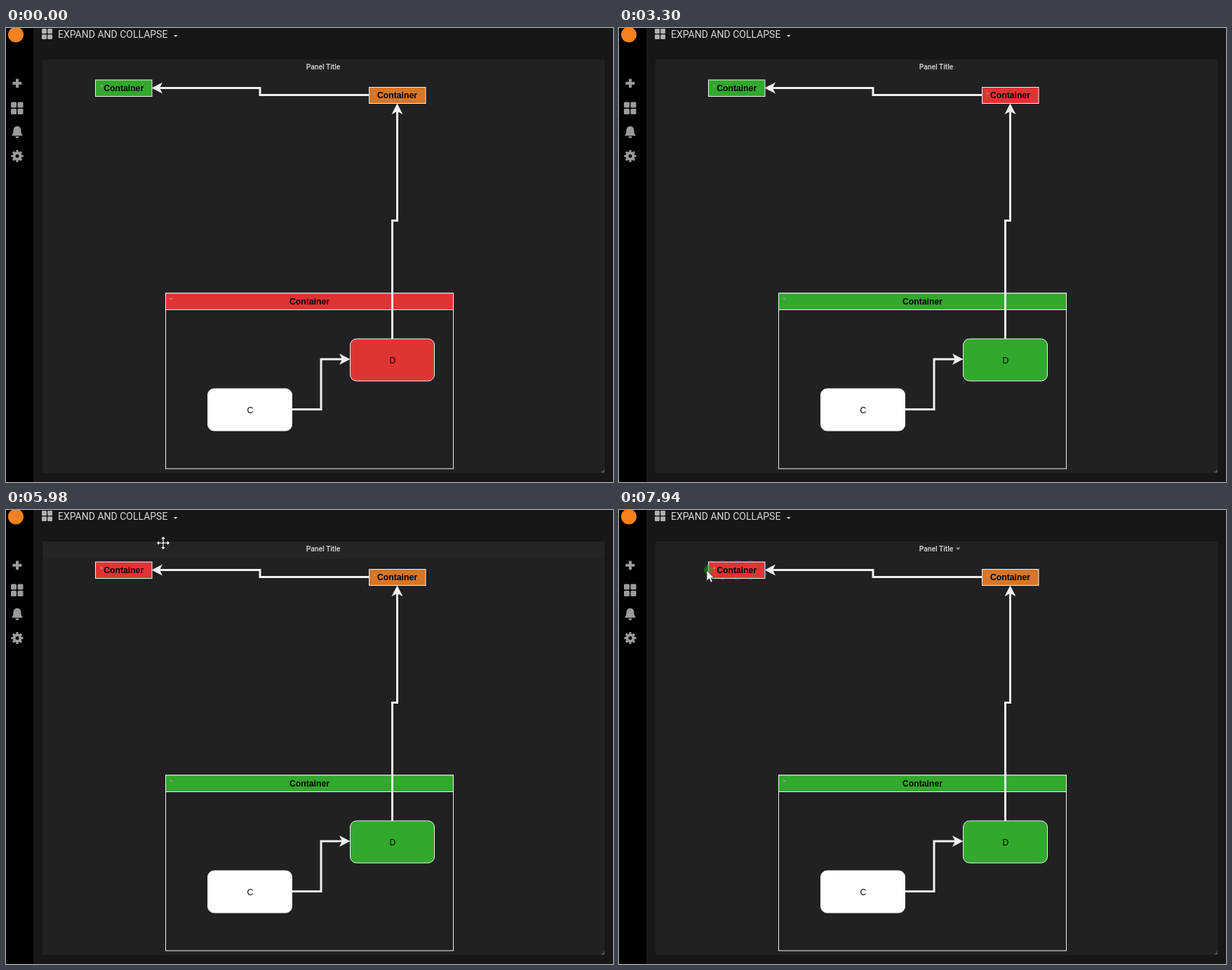
An HTML page for the animation above (8 s loop, 865 by 647 pixels).

```html
<!DOCTYPE html>
<html lang="en">
<head>
<meta charset="utf-8">
<title>Expand and collapse</title>
<style>
  html, body { margin: 0; width: 100%; height: 100%; overflow: hidden; background: #161719; }
  svg { display: block; width: 865px; height: 647px; }
  text { font-family: Roboto, sans-serif; fill: #d8d9da; }
  .label { font: bold 12.2px "Liberation Sans", Arial, sans-serif; fill: #000; text-anchor: middle; }
  .letter { font-weight: normal; }
  .frame { stroke: #f0f0f0; }
  .wire { fill: none; stroke: #f0f0f0; stroke-width: 3; }
  .tip { fill: #f0f0f0; }
  .fold { fill: #b4a8a8; opacity: .65; }
  .icon { fill: #9b9b9b; }
  #tooltip text { font-size: 9.7px; }
  #tooltip .strong { font-weight: 700; }
  #sparks { fill: none; stroke-width: 1; }
</style>
</head>
<body>
<svg viewBox="0 0 865 647">
  <defs>
    <path id="arrowhead" class="tip" d="M0 0L-15.5-8L-11.5 0L-15.5 8Z"/>
    <g id="grid">
      <rect width="8" height="8" rx="1.5"/><rect x="9.5" width="8" height="8" rx="1.5"/>
      <rect y="9.5" width="8" height="8" rx="1.5"/><rect x="9.5" y="9.5" width="8" height="8" rx="1.5"/>
    </g>
  </defs>

  <rect width="865" height="647" fill="#161719"/>
  <rect width="39" height="647"/>
  <circle cx="14" cy="9.5" r="11" fill="#f5821f"/>
  <g class="icon">
    <path d="M14 72.5h4v4.2h4.3v4H18v4.2h-4v-4.2H9.300v-4H14z"/>
    <use href="#grid" x="7" y="105.500"/>
    <path d="M16 140c-4 0-5.500 3-5.500 6.500 0 4-1.500 5-2.500 7h16c-1-2-2.500-3-2.500-7 0-3.500-1.500-6.500-5.500-6.500zM13.500 154.500h5a2.500 2.500 0 0 1-5 0z"/>
    <g fill="none" stroke="#9b9b9b">
      <circle cx="16" cy="182.500" r="4.500" stroke-width="4"/>
      <circle cx="16" cy="182.500" r="7.200" stroke-width="2.800" pathLength="16" stroke-dasharray="1.100 .9" stroke-dashoffset=".55"/>
    </g>
    <use href="#grid" transform="translate(51 1) scale(.86)" fill="#b0b0b0"/>
  </g>
  <text x="74" y="14" font-size="14">EXPAND AND COLLAPSE</text>
  <path d="M239 10h5.500l-2.750 3z" fill="#d8d9da"/>

  <rect x="52" y="45" width="801" height="589" fill="#212124"/>
  <rect id="header" x="52" y="45" width="801" height="24" fill="#252528"/>
  <text x="452" y="59" font-size="10.300" font-weight="500" text-anchor="middle">Panel Title</text>
  <path id="menuCaret" d="M480 53.500h6.500l-3.250 3.800z" fill="#8e8e8e"/>
  <path d="M852 629v4h-4M850 633l2-2" fill="none" stroke="#77787a" stroke-width=".8"/>
  <g id="spinner" fill="#8e8e8e"></g>

  <rect class="frame" x="227.500" y="378" width="410" height="250" fill="none"/>
  <g class="frame">
    <rect id="boxA" x="127.500" y="74" width="80.500" height="23.500"/>
    <rect id="boxB" x="517.500" y="84.500" width="80.500" height="23"/>
    <rect id="titleD" x="227.500" y="378" width="410" height="23.500"/>
    <rect id="boxD" x="490.500" y="443" width="120" height="60" rx="9"/>
    <rect x="287.500" y="514" width="120" height="60" rx="9" fill="#fff"/>
  </g>
  <g class="fold">
    <path d="M135 80.500l3 2.200-3 2.200z"/>
    <path d="M524.500 91l3 2.200-3 2.200z"/>
    <path d="M233 385h5.500l-2.750 2.500z"/>
  </g>
  <g class="label">
    <text class="label" x="167.700" y="89.500">Container</text>
    <text class="label" x="557.500" y="100">Container</text>
    <text class="label" x="432.500" y="393.500">Container</text>
    <text class="label letter" x="551" y="478">D</text>
    <text class="label letter" x="348" y="549">C</text>
  </g>
  <path class="wire" d="M517 95.500H362V85.500H218M550.500 443V274.500H557.500V118M408 543.500H449V472H480"/>
  <use href="#arrowhead" transform="translate(207.500 85.500) rotate(180)"/>
  <use href="#arrowhead" transform="translate(557.500 107.500) rotate(-90)"/>
  <use href="#arrowhead" transform="translate(490.500 472)"/>

  <path id="anchors" fill="none" stroke="#29b6f2" stroke-width=".9"/>
  <circle id="target" cx="127.500" cy="85.500" r="6.500" fill="#00c800" opacity=".42"/>

  <g id="tooltip">
    <rect x="195" y="88" width="102.500" height="162.500" rx="3" fill="#141414"/>
    <text class="strong" x="206" y="106">2019-10-29 7:30:2</text>
    <text x="206" y="125">M3 : <tspan class="strong" fill="#e03434">16.76</tspan></text>
    <text x="206" y="188">M4 : <tspan class="strong" fill="#e57a28">45.01</tspan></text>
    <g id="sparks">
      <path id="sparkM3" stroke="#e03434"/>
      <path id="sparkM4" stroke="#d67628"/>
    </g>
  </g>

  <path id="moveCursor" fill="#fff" stroke="#000" stroke-width=".8"
    d="M0-9.500l3.800 4H1v4.500h4.500v-2.800L9.500 0l-4 3.800V1H1v4.500h2.800L0 9.500l-3.800-4H-1V1h-4.500v2.800L-9.500 0l4-3.800V-1H-1v-4.500h-2.800z"/>
  <path id="pointer" fill="#fff" stroke="#222" stroke-width=".8"
    d="M0 0V15L3.500 11.800L5.800 17L8.300 16L6 10.800H10.500Z"/>
</svg>

<script>
const LOOP = 8000;
const $ = id => document.getElementById(id);
const show = (id, on) => $(id).style.display = on ? '' : 'none';
const COLORS = { g: '#32a82d', o: '#d67628', r: '#e03434' };

// start time and colours of the three containers
const STATES = [
  [0, 'gor'], [500, 'rog'], [1500, 'ror'], [2460, 'rrr'],
  [3300, 'grg'], [4140, 'gro'], [5100, 'rog']
];
const LOADING = [[1420, 1500], [2380, 2460], [3220, 3300], [4100, 4140], [5020, 5100]];
// time, x, y
const CURSOR = [
  [5780, 246, 46], [5980, 224, 47], [6020, 224, 47], [6420, 175, 84],
  [7180, 175, 84], [7820, 98, 85], [7900, 112, 86], [7940, 125, 86]
];

for (let i = 0; i < 8; i++) {
  const a = i * Math.PI / 4;
  $('spinner').innerHTML +=
    `<circle cx="${844.8 + 3.8 * Math.cos(a)}" cy="${53.5 + 3.8 * Math.sin(a)}" r=".9"/>`;
}

const cross = (x, y) => `M${x - 1.5} ${y - 1.5}l3 3m0-3l-3 3`;
$('anchors').setAttribute('d', [.25, .5, .75].map(k => {
  const x = 127.5 + 80.5 * k, y = 74 + 23.5 * k;
  return cross(x, 74) + cross(x, 97.5) + cross(127.5, y) + cross(208, y);
}).join(''));

function spark(id, top, phase) {
  const points = Array.from({ length: 12 }, (_, i) =>
    `${206 + i * 7.1} ${top + 22 + 20 * Math.sin(i * 2.3 + phase)}`);
  $(id).setAttribute('d', 'M' + points.join('L'));
}
spark('sparkM3', 133, 1);
spark('sparkM4', 196, 3);

function cursorAt(t) {
  const i = CURSOR.findIndex(k => k[0] > t);
  if (i < 0) return CURSOR.at(-1).slice(1);
  if (i === 0) return null;
  const [t0, x0, y0] = CURSOR[i - 1], [t1, x1, y1] = CURSOR[i];
  const p = (t - t0) / (t1 - t0);
  return [x0 + (x1 - x0) * p, y0 + (y1 - y0) * p];
}

function render(t) {
  const colors = STATES.findLast(s => s[0] <= t)[1];
  ['boxA', 'boxB', 'boxD'].forEach((id, i) => $(id).setAttribute('fill', COLORS[colors[i]]));
  $('titleD').setAttribute('fill', COLORS[colors[2]]);
  show('spinner', LOADING.some(([from, to]) => t >= from && t < to));

  const at = cursorAt(t);
  const onHeader = at && at[1] < 69;
  const onBox = at && at[1] >= 74 && at[0] >= 127 && at[0] <= 208;
  const targeted = t >= 7940;
  show('header', onHeader);
  show('menuCaret', t >= 6060);
  show('anchors', onBox || targeted);
  show('target', targeted);
  show('tooltip', t >= 6860 && onBox);
  show('sparks', t >= 7020);
  show('moveCursor', onHeader || onBox);
  show('pointer', at && !onHeader && !onBox);
  if (at) for (const id of ['moveCursor', 'pointer'])
    $(id).setAttribute('transform', `translate(${at})`);
}

function tick() {
  render(performance.now() % LOOP);
  requestAnimationFrame(tick);
}
tick();
</script>
</body>
</html>
```
